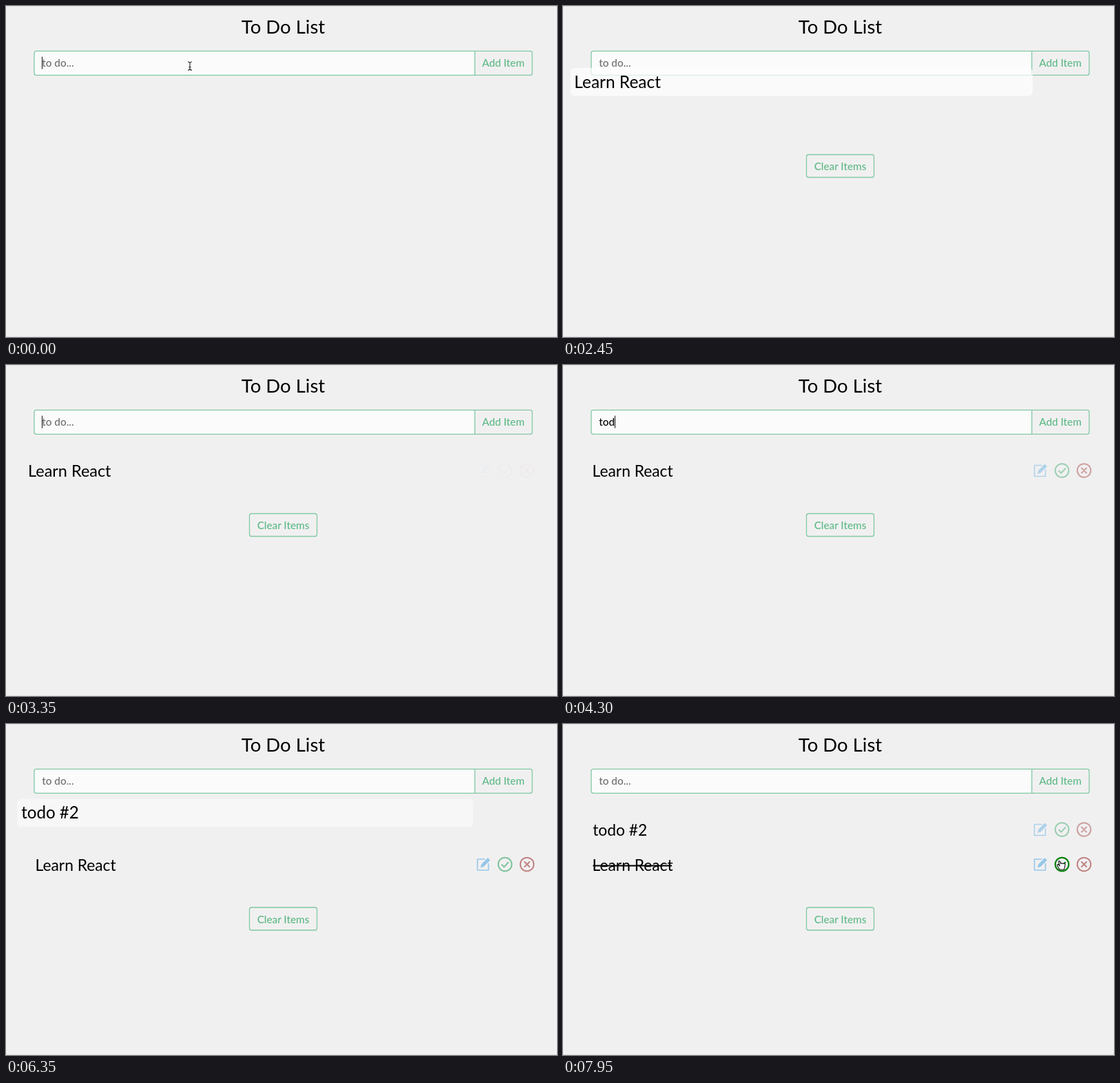
Write an HTML page that moves like this. It is 800 px wide and 480 px high and loops after 8000 ms.

```html
<!DOCTYPE html>
<html lang="en">
<head>
<meta charset="utf-8">
<title>To Do List</title>
<style>
  html, body { margin: 0; width: 100%; height: 100%; overflow: hidden; background: #f1f0f1; }
  svg { display: block; width: 800px; height: 480px; font: 500 15.3px Lato, sans-serif; }
  text { white-space: pre; }
  .title { font-size: 27.5px; font-weight: 400; }
  .item text { font-size: 22.8px; font-weight: 400; }
  .mid { text-anchor: middle; }
  .green { fill: #5cb985; }
  .frame { fill: none; stroke: #82c9a4; stroke-width: 1.3; }
  .icons { fill: none; stroke-width: 2; stroke-linecap: round; stroke-linejoin: round; }
</style>
</head>
<body>
<svg viewBox="0 0 800 480">
  <defs>
    <g id="icons" class="icons">
      <g stroke="#96c7e8" stroke-width="1.6">
        <path d="M695 145.5H684.5V161.5H700.5V152"/>
        <path d="M689.5 157l1-4 9-9 3 3-9 9z" fill="#96c7e8" stroke-width=".8"/>
      </g>
      <g stroke="#80c59d"><circle cx="724.5" cy="153" r="9.8"/><path d="M720 153.5l3.2 3.2 6-6.4"/></g>
      <g stroke="#c08583"><circle cx="756.5" cy="153" r="9.8"/><path d="M753 149.5l7 7m0-7l-7 7"/></g>
    </g>
  </defs>
  <path d="M0 .5H800M0 479.5H800" stroke="#e5e4e5"/>
  <text class="title mid" x="402.5" y="39.5">To Do List</text>

  <path d="M681 65.5H44a3 3 0 0 0-3 3V97a3 3 0 0 0 3 3H681z" fill="#fcfbfc"/>
  <rect class="frame" x="41" y="65.3" width="723" height="35" rx="3"/>
  <path class="frame" d="M680.7 65V100"/>
  <text class="mid green" x="722" y="88">Add Item</text>
  <text id="field" x="52.3" y="88"></text>
  <path id="caret" d="M.5 73.5V91.5" stroke="#111"/>

  <g id="clear">
    <rect class="frame" x="353.5" y="215.5" width="98" height="33" rx="3"/>
    <text class="mid green" x="402.5" y="238">Clear Items</text>
  </g>

  <g id="first" class="item">
    <g class="body">
      <rect class="panel" x="37.5" y="135" width="625.5" height="38" rx="6" fill="#fff"/>
      <text x="42.6" y="162">Learn React</text>
    </g>
    <use class="tools" href="#icons"/>
    <g id="done">
      <path d="M43.5 155H158" stroke="#000" stroke-width="2"/>
      <g class="icons" stroke="#078007"><circle cx="724.5" cy="153" r="9.8"/><path d="M720 153.5l3.2 3.2 6-6.4"/></g>
    </g>
  </g>
  <g id="second" class="item">
    <g class="body">
      <rect class="panel" x="37.5" y="135" width="625.5" height="38" rx="6" fill="#fff"/>
      <text x="43.2" y="162">todo #2</text>
    </g>
    <use class="tools" href="#icons"/>
  </g>

  <g id="cursor">
    <path id="beam" d="M-3-6Q0-6 0-4Q0-6 3-6M0-4V4M-3 6Q0 6 0 4Q0 6 3 6M-1.5 1.5H1.5" fill="none" stroke="#222" stroke-width="1.1"/>
    <path id="arrow" d="M0 0V13l3-2.8 2 4.8 2-.9-2-4.6h4.2z" fill="#111" stroke="#fff" stroke-width=".9"/>
    <path id="hand" d="M-3 7l-3.5-6q0-2 2-1l1.5 1.5-1.5-6q1-2 2.2 0l1 3q1-1.5 2.2 0q1.2-1 2.2.2q1.8-.8 2 1l-.6 4-1 3.3z" fill="#fff" stroke="#111" stroke-width="1.1"/>
  </g>
</svg>
<script>
const LOOP = 8000, ADD_FIRST = 2450, ADD_SECOND = 6050, CLICK = 7800, ROW = 50.5;
const $ = id => document.getElementById(id);
const clamp = v => Math.max(0, Math.min(1, v));
const show = (id, on) => $(id).setAttribute('visibility', on ? 'inherit' : 'hidden');
const move = (el, x, y) => el.setAttribute('transform', `translate(${x} ${y})`);

const entries = [
  { text: 'Learn React', keys: [450, 650, 700, 800, 900, 1100, 1350, 1400, 1550, 1700, 1900], end: ADD_FIRST },
  { text: 'todo #2', keys: [3850, 4000, 4150, 4350, 4550, 5200, 5650], end: ADD_SECOND }
];

function drawField(t) {
  const entry = entries.find(e => t >= e.keys[0] && t < e.end);
  const typed = entry ? entry.text.slice(0, entry.keys.filter(k => k <= t).length) : '';
  const field = $('field');
  field.textContent = typed || 'to do...';
  field.setAttribute('fill', typed ? '#000' : '#6d6d6d');
  const caretX = typed ? 52 + Math.round(field.getComputedTextLength()) : 52;
  move($('caret'), caretX, 0);
  // The caret blinks every 500 ms, counted from the last key.
  const lastKey = entries.flatMap(e => e.keys).filter(k => k <= t).pop() ?? -450;
  show('caret', t < CLICK && Math.floor((t - lastKey) / 500) % 2 === 0);
}

function drawItem(id, age, y) {
  const item = $(id), part = name => item.querySelector(name);
  show(id, age >= 0);
  move(item, 0, y);
  const scale = 1 + 0.073 * (1 - clamp(age / 1500));
  const drop = -44 * (1 - clamp(age / 700));
  part('.body').setAttribute('transform',
    `translate(402.5 ${154 + drop}) scale(${scale}) translate(-402.5 -154)`);
  part('.panel').setAttribute('opacity', 0.7 * (1 - clamp(age / 900)));
  part('.tools').setAttribute('opacity', 1 - (1 - clamp((age - 850) / 2100)) ** 2);
}

function drawCursor(t) {
  const p = clamp((t - 6800) / 850), ease = p * p * (3 - 2 * p);
  const x = 267 + 457 * ease, y = 87 + 117 * ease;
  move($('cursor'), x, y);
  show('cursor', t < 450 || t >= 6800);
  const shape = y < 100 ? 'beam' : x > 714 ? 'hand' : 'arrow';
  for (const id of ['beam', 'arrow', 'hand']) $(id).setAttribute('display', id === shape ? 'inline' : 'none');
}

function draw(now) {
  const t = now % LOOP, shift = t >= ADD_SECOND ? ROW : 0;
  drawField(t);
  show('clear', t >= ADD_FIRST);
  move($('clear'), 0, shift);
  drawItem('first', t - ADD_FIRST, shift);
  drawItem('second', t - ADD_SECOND, 0);
  show('done', t >= CLICK);
  drawCursor(t);
  requestAnimationFrame(draw);
}

const start = performance.now();
requestAnimationFrame(now => draw(Math.max(0, now - start)));
</script>
</body>
</html>
```
